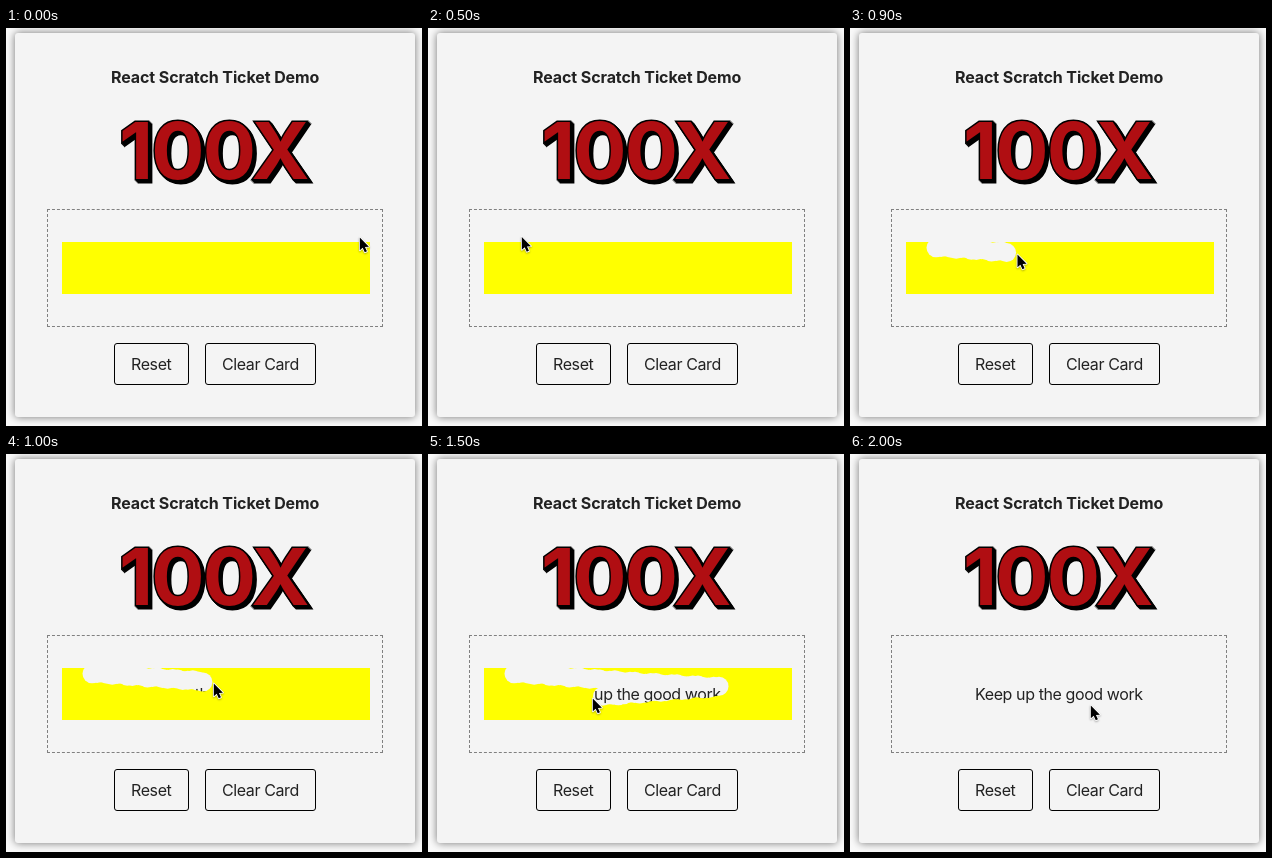
Write an HTML page with a canvas that moves like this. It is 416x398 px and loops after 2100 ms.

```html
<!DOCTYPE html>
<html lang="en">
<head>
<meta charset="utf-8">
<title>Scratch ticket</title>
<style>
html, body { margin: 0; width: 100%; height: 100%; overflow: hidden; background: #fafafa; }
canvas { display: block; width: 416px; height: 398px; }
.ticket {
  position: absolute; left: 41px; top: 181px; width: 336px; height: 118px;
  box-sizing: border-box; border: 1px dashed #808080;
}
</style>
</head>
<body>
<canvas id="stage"></canvas>
<div class="ticket"></div>
<script>
const W = 416, H = 398, STEP = 100, STEPS = 21;
const SCRATCH_START = 7, CLEARED = 16, BRUSH_LAG = .25, BRUSH_RADIUS = 9.5;
const FONT = 'Inter, "Liberation Sans", sans-serif';
const INK = '#222';
const stage = document.getElementById('stage');
const foil = document.createElement('canvas');
const dpr = window.devicePixelRatio || 1;

function setup(canvas) {
  canvas.width = W * dpr;
  canvas.height = H * dpr;
  const c = canvas.getContext('2d');
  c.scale(dpr, dpr);
  return c;
}
const ctx = setup(stage), foilCtx = setup(foil);

// Turning points of the pointer: step, x, y
const path = [
  [0, 353, 208], [3, 100, 196], [7, 86, 219], [10, 207, 228], [12, 291, 233],
  [15, 164, 243], [16, 122, 246], [18, 157, 251], [20, 240, 250]
];

function pointerAt(t) {
  const i = Math.max(1, path.findIndex(p => p[0] >= t));
  const [t0, x0, y0] = path[i - 1], [t1, x1, y1] = path[i];
  const k = (t - t0) / (t1 - t0);
  return [x0 + (x1 - x0) * k, y0 + (y1 - y0) * k];
}

function text(str, x, y, size, weight, spacing, color) {
  ctx.font = `${weight} ${size}px ${FONT}`;
  ctx.letterSpacing = spacing + 'px';
  ctx.fillStyle = color;
  ctx.fillText(str, x, y);
}

function drawCard() {
  ctx.fillStyle = '#fafafa';
  ctx.fillRect(0, 0, W, H);
  ctx.save();
  ctx.shadowColor = 'rgba(0,0,0,.55)';
  ctx.shadowBlur = 8 * dpr;
  ctx.fillStyle = '#f4f4f4';
  ctx.beginPath();
  ctx.roundRect(9, 5, 400, 384, 3);
  ctx.fill();
  ctx.restore();
}

function drawPrize() {
  const x = 113, y = 151, size = 79, spacing = -1.8;
  ctx.lineJoin = 'miter';
  ctx.miterLimit = 3;
  ctx.lineWidth = 3;
  ctx.strokeStyle = '#000';
  for (let d = 3; d >= 0; d--) {
    text('100X', x + d, y + d, size, 700, spacing, '#000');
    ctx.strokeText('100X', x + d, y + d);
  }
  text('100X', x, y, size, 700, spacing, '#b00e12');
}

function drawButton(label, x, w) {
  ctx.strokeStyle = '#000';
  ctx.lineWidth = 1;
  ctx.beginPath();
  ctx.roundRect(x + .5, 315.5, w - 1, 41, 2.5);
  ctx.stroke();
  text(label, x + 17, 342, 16, 400, -.4, INK);
}

function drawFoil(step) {
  if (step >= CLEARED) return;
  const c = foilCtx;
  c.globalCompositeOperation = 'source-over';
  c.clearRect(0, 0, W, H);
  c.fillStyle = '#ff0';
  c.fillRect(56, 214, 308, 52);
  c.globalCompositeOperation = 'destination-out';
  for (let t = SCRATCH_START; t <= step - BRUSH_LAG; t += .125) {
    const [x, y] = pointerAt(t);
    c.beginPath();
    c.arc(x, y + .8 * Math.sin(x * .9), BRUSH_RADIUS, 0, 2 * Math.PI);
    c.fill();
  }
  ctx.drawImage(foil, 0, 0, W, H);
}

function drawPointer([x, y]) {
  ctx.save();
  ctx.translate(x + .8, y + 1.5);
  ctx.scale(.83, .83);
  const arrow = new Path2D('M0 0V15.5L3.5 12.2 6 17.8 8.6 16.7 6.2 11.3 11 11Z');
  ctx.lineJoin = 'round';
  ctx.lineWidth = 2;
  ctx.strokeStyle = '#fff';
  ctx.shadowColor = 'rgba(0,0,0,.3)';
  ctx.shadowBlur = 2 * dpr;
  ctx.shadowOffsetY = dpr;
  ctx.stroke(arrow);
  ctx.shadowColor = 'transparent';
  ctx.fillStyle = '#000';
  ctx.fill(arrow);
  ctx.restore();
}

function draw(now) {
  const step = Math.floor(now / STEP) % STEPS;
  drawCard();
  text('React Scratch Ticket Demo', 105, 55, 16, 700, -.1, INK);
  drawPrize();
  text('Keep up the good work', 125, 246, 16, 400, -.4, INK);
  drawFoil(step);
  drawButton('Reset', 108, 75);
  drawButton('Clear Card', 199, 111);
  drawPointer(pointerAt(step));
}

const start = performance.now();
function loop() {
  draw(performance.now() - start);
  requestAnimationFrame(loop);
}
loop();
</script>
</body>
</html>
```
